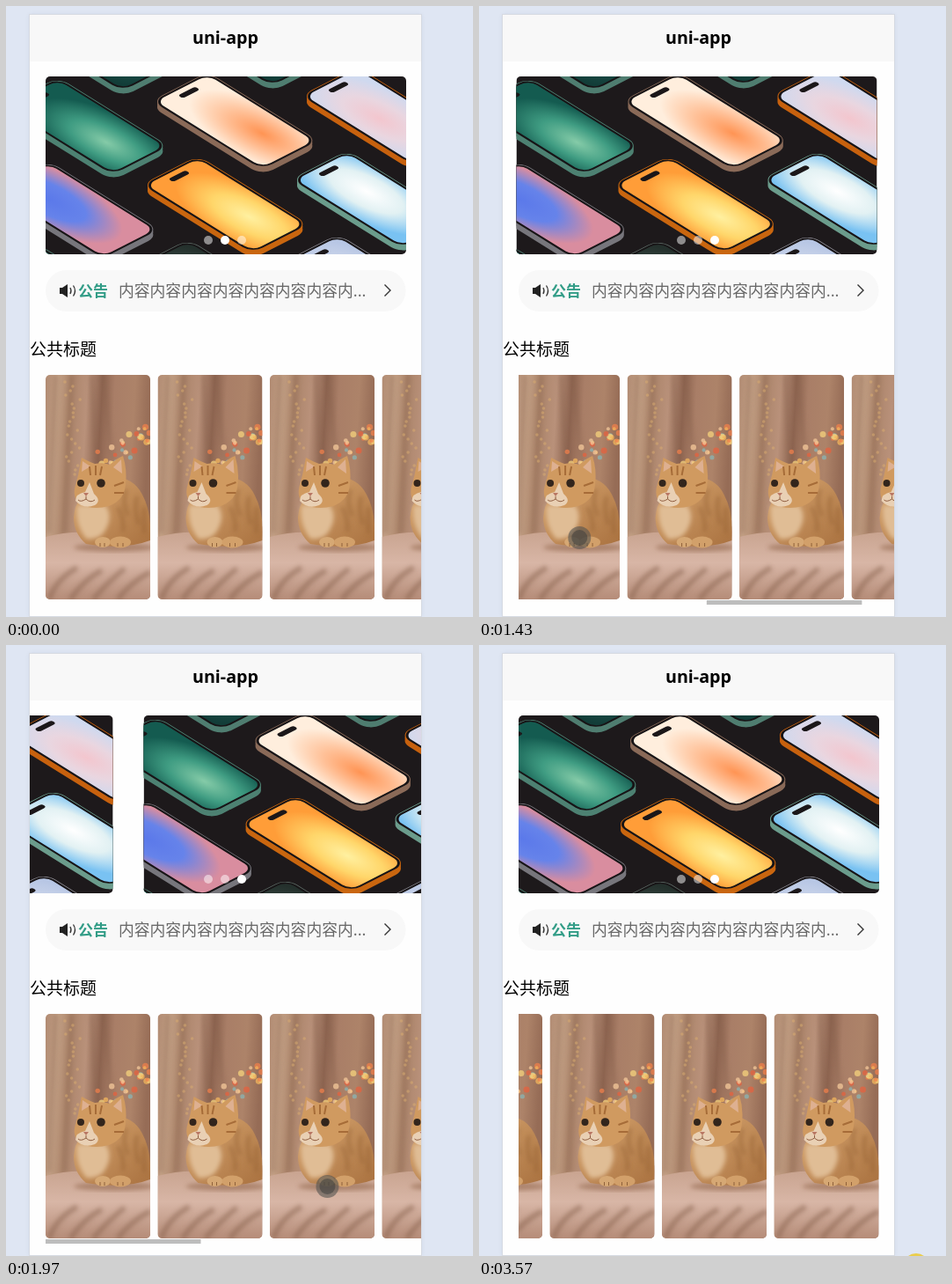
Write an HTML page that moves like this. It is 531 by 694 pixels and loops after 3700 ms.

```html
<!DOCTYPE html>
<html lang="zh">
<head>
<meta charset="utf-8">
<style>
  html, body { margin: 0; width: 100%; height: 100%; overflow: hidden; background: #dfe6f3; }
  svg { display: block; width: 531px; height: 694px; }
  text { font-family: "Noto Sans CJK SC", "Noto Sans CJK", sans-serif; }
  .title { font: bold 19.7px "Open Sans", "Noto Sans", sans-serif; text-anchor: middle; }
</style>
</head>
<body>
<svg viewBox="0 0 531 694">
  <defs>
    <clipPath id="screen"><rect x="27" y="10" width="445" height="683"/></clipPath>
    <clipPath id="list"><rect x="45" y="419" width="427" height="256"/></clipPath>
    <clipPath id="notice"><rect x="128" y="300" width="284" height="47"/></clipPath>
    <clipPath id="slideBox"><rect width="410" height="202" rx="5"/></clipPath>
    <clipPath id="cardBox"><rect width="119" height="255" rx="5"/></clipPath>
    <filter id="soft" x="-20%" y="-20%" width="140%" height="140%"><feGaussianBlur stdDeviation="2.500"/></filter>
    <linearGradient id="curtain" y2=".12">
      <stop offset="0" stop-color="#b08a72"/><stop offset=".12" stop-color="#c4a186"/>
      <stop offset=".24" stop-color="#ab846a"/><stop offset=".4" stop-color="#b9917a"/>
      <stop offset=".54" stop-color="#8d6450"/><stop offset=".66" stop-color="#a97e67"/>
      <stop offset=".85" stop-color="#ad8369"/><stop offset="1" stop-color="#966c56"/>
    </linearGradient>
    <linearGradient id="bed" x2="0" y2="1">
      <stop offset="0" stop-color="#c6a18c"/><stop offset=".5" stop-color="#d8b6a6"/>
      <stop offset="1" stop-color="#b58c78"/>
    </linearGradient>
    <linearGradient id="fur" x2="1" y2="1">
      <stop offset="0" stop-color="#d8a772"/><stop offset="1" stop-color="#a9713f"/>
    </linearGradient>

    <g id="card" clip-path="url(#cardBox)">
      <rect width="119" height="255" fill="url(#curtain)"/>
      <path d="M12 0L4 180M30 0L22 180M52 0L58 110M66 0L76 100" stroke="#85604b" stroke-width="5" opacity=".35" filter="url(#soft)"/>
      <g id="lights"></g>
      <path d="M0 184Q30 176 60 180T119 172V255H0Z" fill="url(#bed)"/>
      <path d="M4 255Q12 232 36 219M28 255Q44 232 64 222M54 255Q72 234 90 220M82 255Q96 236 119 224" fill="none" stroke="#86604c" stroke-width="6" opacity=".5" filter="url(#soft)"/>
      <ellipse cx="78" cy="196" rx="46" ry="5" fill="#94694f" opacity=".6" filter="url(#soft)"/>
      <path d="M76 116Q100 116 110 136Q121 156 119 188Q90 199 46 192Q32 180 32 162Q33 148 40 140Z" fill="url(#fur)"/>
      <path d="M92 130Q86 145 94 160M104 138Q100 152 106 170M82 150Q90 165 88 178M112 150V180" fill="none" stroke="#925e30" stroke-width="4" opacity=".5" filter="url(#soft)"/>
      <path d="M36 148Q33 170 46 186Q64 188 70 172Q76 160 68 148Z" fill="#e0bd95" filter="url(#soft)"/>
      <path d="M37 114L41 94Q50 99 56 101Q66 99 73 102Q82 94 88 92Q93 108 91 124Q90 142 72 149Q54 154 39 147Q30 139 34 125Z" fill="#d09a60"/>
      <path d="M42 98L51 104 41 110ZM86 96L77 105 87 112Z" fill="#deb091"/>
      <path d="M50 104L51 114M57 103L57 114M64 104L62 114M78 126L89 122M78 134L89 134" stroke="#a66c38" stroke-width="2"/>
      <path d="M50 122L45 133Q34 135 34 143Q43 153 56 148Q64 143 55 135Z" fill="#e9d0b4"/>
      <circle cx="40" cy="123" r="4" fill="#32251c"/><circle cx="63" cy="123" r="4.800" fill="#32251c"/>
      <path d="M43 134H49L46 138Z" fill="#b97764"/>
      <path d="M46 138V141Q40 145 37 142M46 141Q51 146 56 142" fill="none" stroke="#8f5d40"/>
      <ellipse cx="65" cy="190" rx="9" ry="6" fill="#d6a874"/><ellipse cx="85" cy="190" rx="12" ry="6.500" fill="#d2a06a"/>
      <path d="M62 191V195M67 191V195M82 191V195M88 191V195" stroke="#8f613a"/>
    </g>

    <g id="slide" clip-path="url(#slideBox)"><rect width="410" height="202" fill="#1d191b"/></g>
  </defs>

  <rect x="27" y="10" width="445" height="683" fill="#98a4bb" opacity=".3" filter="url(#soft)"/>
  <rect x="26.500" y="9.500" width="446" height="684" fill="#fefefe" stroke="#d6dae2"/>
  <rect x="27" y="10" width="445" height="53" fill="#f8f8f8"/>
  <text class="title" x="249.500" y="43">uni-app</text>

  <g clip-path="url(#screen)">
    <g id="slides"><use href="#slide" x="45" y="80"/><use href="#slide" x="490" y="80"/></g>
    <g id="dots" fill="#fff"><circle cx="230" cy="266" r="5"/><circle cx="249" cy="266" r="5"/><circle cx="268" cy="266" r="5"/></g>
  </g>

  <rect x="45" y="300" width="409.500" height="47" rx="23.500" fill="#f8f8f8"/>
  <path d="M61 320H64L70 316V331L64 327H61Z" fill="#222"/>
  <path d="M73 320Q75 323.500 73 327M76.500 317.500Q80.500 323.500 76.500 329.500" fill="none" stroke="#333" stroke-width="1.300"/>
  <text x="82" y="330.300" font-size="17" font-weight="bold" fill="#319c86">公告</text>
  <g clip-path="url(#notice)"><g id="ticker" font-size="17.800" fill="#686868"></g></g>
  <path d="M430.500 316.500L437 323L430.500 329.500" fill="none" stroke="#333" stroke-width="1.400"/>
  <text x="27" y="396.500" font-size="19">公共标题</text>

  <g clip-path="url(#list)"><g id="cards"></g></g>
  <rect id="bar" y="675" width="176.500" height="5" fill="#bdbdbd"/>
  <g id="touch">
    <circle r="13" fill="#545350" opacity=".6"/><circle r="9" fill="#403f3e" opacity=".55"/>
  </g>
  <g id="mouse">
    <circle r="15" fill="#ecc934" opacity=".88"/><circle cx="-2" cy="-2" r="8" fill="#a27c25" opacity=".8"/>
  </g>
</svg>
<script>
const $ = id => document.getElementById(id);
const add = (id, markup) => $(id).insertAdjacentHTML('beforeend', markup);
const PITCH = 127.5, MAX = 602, SLIDE = 445, LINE = 47, LOOP = 3700;

// Phones on a slanted lattice: screen colours from centre out, glow centre, side colour
const green = ['#85cba8', '#3f9c82', '#145b50'], dark = ['#557f78', '#1c4e48', '#123d38'];
const looks = [
  [dark, .5, .5, '#4f7d70'], [dark, .5, .5, '#4f7d70'], [['#77777f', '#404046', '#29292d'], .5, .5, '#8b8990'],
  [green, .72, .55, '#4d8172'], [['#ff9454', '#ffc097', '#ffeedd'], .72, .42, '#8a6a58'],
  [['#f3c6ce', '#e9d6e0', '#cfd9ef'], .5, .6, '#c7610e'],
  [['#5b79ea', '#6683ea', '#d98d9f'], .3, .6, '#77767c'], [['#fff0a0', '#ffd66a', '#ff9d38'], .7, .45, '#c9660f'],
  [['#ffffff', '#e2f1f3', '#79c2f2'], .4, .45, '#6b9c8c'],
  [green, .5, .5, '#4d8172'], [['#50645f', '#34443f', '#24302c'], .5, .5, '#5c6964'],
  [['#d6dcee', '#cad4ea', '#b7c6e4'], .5, .5, '#8b8990']
];
looks.forEach(([tones, cx, cy, side], n) => {
  const i = n % 3 - 1, j = Math.floor(n / 3) - 1;
  const x = 184.5 + 170 * i - 11 * j, y = -5 - 6 * i + 95 * j;
  const plate = (dy, inset, fill) => `<rect transform="matrix(.9 .56 -.98 .5 ${x} ${y + dy})" x="${inset}" y="${inset}"
    width="${140 - 2 * inset}" height="${66 - 2 * inset}" rx="${13 - inset}" fill="${fill}"/>`;
  add('slide', `<radialGradient id="glow${n}" cx="${cx}" cy="${cy}" r=".62">
    ${tones.map((c, k) => `<stop offset="${k / 2}" stop-color="${c}"/>`).join('')}</radialGradient>` +
    plate(6, 0, side) + plate(3, 0, side) + plate(0, 0, side) + plate(0, .8, '#171416') + plate(0, 3, `url(#glow${n})`) +
    `<rect transform="matrix(.9 .56 -.98 .5 ${x} ${y})" x="9" y="23" width="6" height="20" rx="3" fill="#1b1719"/>`);
});

// Bokeh: a pale string on the left, a brighter swag on the right
let seed = 11;
const rand = () => (seed = seed * 16807 % 2147483647) / 2147483647;
const hues = ['#f3b65c', '#ef7f4b', '#f6d27c', '#8ab4b4', '#e5623f', '#f5c89a'];
for (let i = 0; i < 60; i++) {
  const left = i < 22;
  const x = left ? 22 + rand() * 20 : 58 + rand() * 60;
  const y = left ? 8 + i * 5 : 86 - (x - 60) * .55 + rand() * 28;
  add('lights', `<circle cx="${x}" cy="${y}" r="${left ? 1.8 : 1.6 + rand() * 2}" fill="${left ? '#dcae70' : hues[i % 6]}" opacity="${left ? .5 : .75}"/>`);
}

for (let i = 0; i < 8; i++) add('cards', `<use href="#card" x="${45 + i * PITCH}" y="419"/>`);
for (const y of [330, 330 + LINE]) add('ticker', `<text x="128" y="${y}">${'内容'.repeat(7)}内...</text>`);

// Smooth monotone curve through [time, value] points
function track(keys, t) {
  const n = keys.findIndex(k => k[0] > t);
  if (n < 0) return keys[keys.length - 1][1];
  if (!n) return keys[0][1];
  const rate = i => (keys[i + 1][1] - keys[i][1]) / (keys[i + 1][0] - keys[i][0]);
  const slope = i => {
    if (!i || i === keys.length - 1) return 0;
    const a = rate(i - 1), b = rate(i);
    return a * b > 0 ? 2 * a * b / (a + b) : 0;
  };
  const [t0, a] = keys[n - 1], [t1, b] = keys[n], d = t1 - t0, u = (t - t0) / d;
  return a + (b - a) * u * u * (3 - 2 * u) + d * u * (1 - u) * (slope(n - 1) * (1 - u) - slope(n) * u);
}

const slideKeys = [[1410, 0], [1570, 82], [1970, 333], [2310, 433], [2440, SLIDE]];
const scrollKeys = [[630, 0], [820, MAX], [1380, MAX], [1570, 60.5], [1700, 0], [2060, 0], [2310, 139.5], [2600, MAX]];
const barKeys = [[650, 0], [700, 1], [3000, 1], [3340, 0]];
const tickStarts = [50, 1510, 3010];
const path = [
  [70, 421, 673], [560, 400, 612], [780, 190, 610], [1020, 126, 592], [1290, 66, 604], [1400, 70, 604],
  [1500, 300, 604], [1700, 505, 600], [1970, 366, 615], [2310, 146, 608], [2480, 130, 610],
  [2640, 418, 676], [2800, 485, 692], [3400, 497, 706]
];
const pathX = path.map(p => [p[0], p[1]]), pathY = path.map(p => [p[0], p[2]]);
const within = (t, spans) => spans.some(([a, b]) => t >= a && t < b);
const show = (id, on) => $(id).setAttribute('visibility', on ? 'visible' : 'hidden');
const move = (id, x, y) => $(id).setAttribute('transform', `translate(${x} ${y})`);

function draw(now) {
  const t = now % LOOP, scroll = track(scrollKeys, t);
  move('slides', -track(slideKeys, t), 0);
  const active = t < 1430 ? 1 : 2;
  [...$('dots').children].forEach((dot, i) => dot.setAttribute('opacity', i === active ? 1 : .5));

  const start = tickStarts.filter(s => s <= t).pop() ?? t;
  move('ticker', 0, -track([[0, 0], [400, LINE]], t - start));

  move('cards', -scroll, 0);
  $('bar').setAttribute('x', 45 + scroll / MAX * 250.5);
  $('bar').setAttribute('opacity', track(barKeys, t));

  for (const id of ['touch', 'mouse']) move(id, track(pathX, t), track(pathY, t));
  show('touch', within(t, [[130, 760], [1020, 1480], [1700, 2100], [2590, 2800]]));
  show('mouse', within(t, [[2100, 2450], [3570, LOOP]]));
  requestAnimationFrame(() => draw(performance.now()));
}
draw(0);
</script>
</body>
</html>
```
